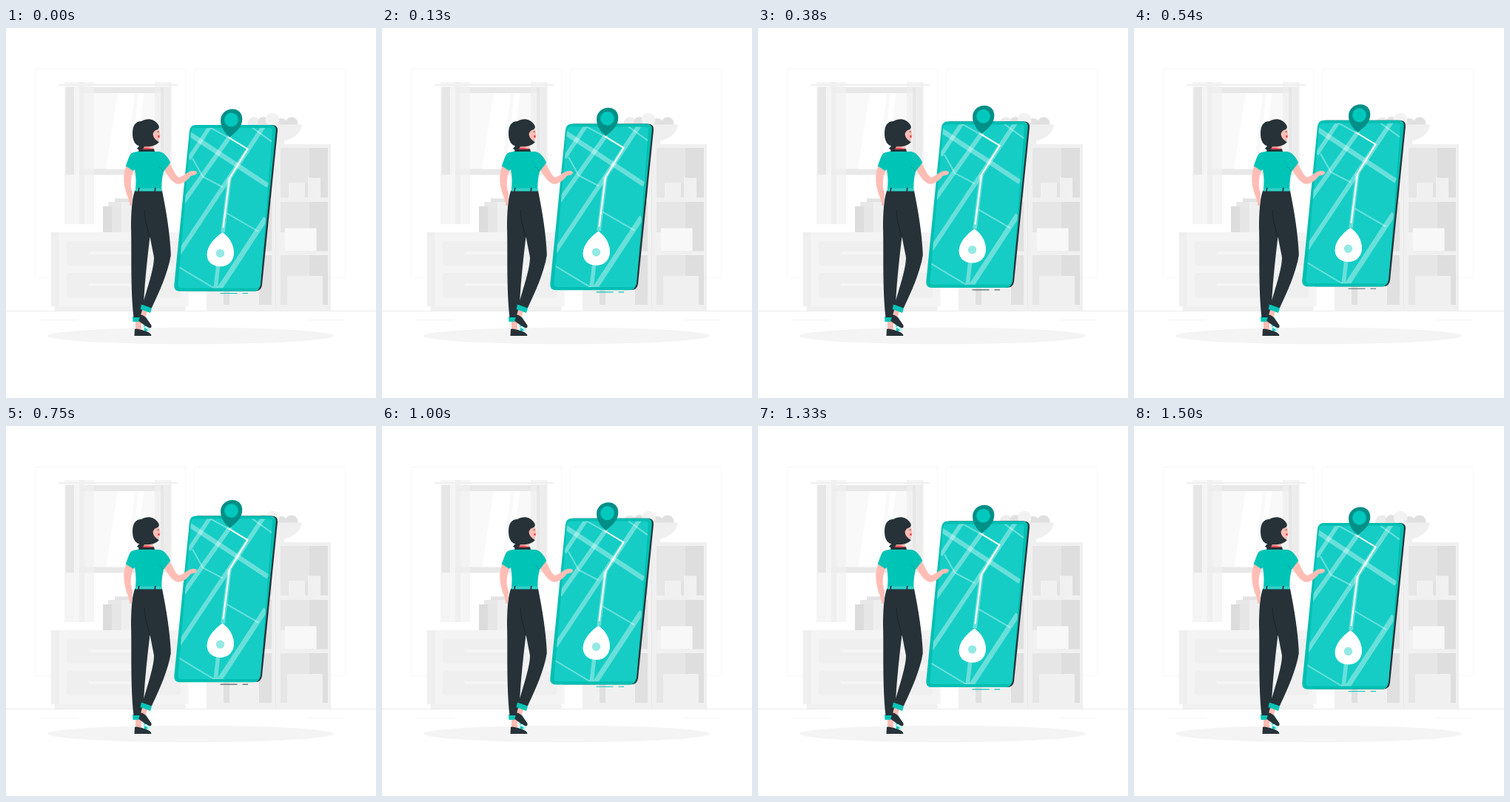
An HTML page with a canvas for the animation above (1.54 s loop, 500 by 500 pixels).

```html
<!DOCTYPE html>
<html lang="en">
<head>
<meta charset="utf-8">
<title>Map walk</title>
<style>
  html, body { margin: 0; width: 100%; height: 100%; overflow: hidden; background: #fff; }
  canvas { display: block; width: 500px; height: 500px; }
</style>
</head>
<body>
<canvas id="stage" width="500" height="500"></canvas>
<script>
const ctx = document.getElementById('stage').getContext('2d');
const LOOP = 1540, STEPS = 37, PEAK = 18, LIFT = 9.4;
const DARK = '#263238', SKIN = '#ffbdb5', TEAL = '#00c4b6', DEEP = '#008f87';

function box(color, x1, y1, x2, y2, r = 0) {
  ctx.fillStyle = color;
  ctx.beginPath();
  ctx.roundRect(x1, y1, x2 - x1, y2 - y1, r);
  ctx.fill();
}

function oval(color, x, y, rx, ry = rx) {
  ctx.fillStyle = color;
  ctx.beginPath();
  ctx.ellipse(x, y, rx, ry, 0, 0, Math.PI * 2);
  ctx.fill();
}

function shape(color, d) {
  ctx.fillStyle = color;
  ctx.fill(new Path2D(d));
}

function line(color, width, d) {
  ctx.strokeStyle = color;
  ctx.lineWidth = width;
  ctx.stroke(new Path2D(d));
}

function room() {
  box('#fff', 0, 0, 500, 500);
  line('#f8f8f8', 1, 'M39.5 55.5H242.5V337.5H39.5Z M254.5 55.5H458.5V337.5H254.5Z');
  line('#ebebeb', 1, 'M0 382.5H500');
  line('#f5f5f5', 1, 'M48 394.5H97 M407 394.5H456');
  oval('#f4f4f4', 249.5, 416, 193.5, 11.3);
}

function windowFrame() {
  box('#e8e8e8', 80, 80, 222, 198.5);
  box('#f9f9f9', 92, 88, 212, 190.5);
  shape('#fff', 'M151 88H174L162 190.5H135Z M179 88H186L174 190.5H167Z');
  ctx.globalAlpha = 0.72;
  box('#f1f1f1', 79, 73, 119, 265);
  box('#e4e4e4', 81, 80, 92, 198);
  box('#f7f7f7', 92, 73, 99, 265);
  box('#ededed', 99, 73, 106, 265);
  box('#efefef', 201, 73, 224, 198);
  box('#e4e4e4', 209, 80, 213, 198);
  ctx.globalAlpha = 1;
  box('#f0f0f0', 71, 75.7, 231.5, 78);
}

function dresser() {
  box('#dcdcdc', 131, 241, 144, 276);
  box('#f0f0f0', 147, 230.5, 172, 276);
  box('#e2e2e2', 147, 230.5, 172, 235);
  box('#e8e8e8', 138, 235, 168, 241);
  box('#e6e6e6', 143, 241, 156, 276);
  box('#efefef', 156, 235, 168, 276);
  box('#f0f0f0', 66, 376, 242.5, 382);
  box('#f4f4f4', 61, 276, 246.5, 376);
  box('#efefef', 61, 276, 72, 376);
  for (const y of [288, 331]) {
    box('#efefef', 82, y, 236, y + 33, 4);
    box('#f5f5f5', 112, y + 14, 206, y + 18);
  }
}

function shelf() {
  oval('#ebebeb', 335, 129, 8.5);
  oval('#e0e0e0', 348, 128, 8);
  oval('#e0e0e0', 372, 130, 8);
  oval('#dfdfdf', 386, 129, 8.5);
  oval('#f2f2f2', 360, 124, 9.3);
  shape('#efefef', 'M328 130.5H400C398 144 384 154 364 154C344 154 330 144 328 130.5Z');
  box('#f0f0f0', 352, 153, 376, 157);

  box('#f0f0f0', 271, 157, 439, 382.5);
  for (const [top, bottom] of [[162, 229], [235, 301.5], [307, 374]]) {
    box('#e0e0e0', 294, top, 359, bottom);
    box('#e6e6e6', 371, top, 410, bottom);
    box('#dedede', 410, top, 435, bottom);
  }
  box('#f0f0f0', 302, 335, 342, 374);
  line('#e9e9e9', 1, 'M364.5 157V382');

  box('#f0f0f0', 382, 209, 404, 229);
  box('#e2e2e2', 404, 209, 408, 229);
  box('#f0f0f0', 408, 202.5, 425, 229);
  box('#f8f8f8', 377, 270.5, 419.5, 301.5);
  box('#f2f2f2', 371, 276, 377, 301.5);
  box('#f0f0f0', 380, 335, 428, 374);
}

function roads() {
  ctx.save();
  ctx.clip(new Path2D('M255 135H356Q360.5 135 360 140L344 346Q343.5 351.5 338 351.5H237Q232 351.5 232.5 346L250 140Q250.5 135 255 135Z'));
  box('#15cdc5', 225, 130, 370, 360);
  const pale = 'rgba(255,255,255,.36)';
  line(pale, 6.5, 'M247 142.500L354 213');
  line(pale, 6, 'M348 133L234 304 M303 146L240 235');
  line(pale, 5.5, 'M276 133L247 177');
  line(pale, 7, 'M351 257L288 353');
  line(pale, 5.5, 'M287 318L283 353 M302 203L293 276');
  line(pale, 2, 'M252 176L266 201L293 215 M275 134L302 149 M332 134L361 155 M298 250L341 275 M232 322L282 352');
  ctx.restore();
}

function phone(step) {
  shape(DARK, 'M258 131H359Q367.500 131 367 139L346 347Q345 355.500 337 355.500H245Z');
  shape('#00bfb2', 'M257 131H357Q365.500 131 364.800 139L343.600 347Q342.500 355.700 334.500 355.700H235Q226.500 355.700 227.300 347L248 139Q249 131 257 131Z');
  roads();
  ctx.lineJoin = 'miter';
  line('#fff', 2, 'M301 148L326.500 163.500L302 203L293.500 270');
  shape('#fff', 'M292.500 276C301 282 308 292 308 304C308 315 300 322.300 290 322.300C279 322.300 271.500 316 271.500 306C272 293 283 283 292.500 276Z');
  oval('#94e9e4', 289.500, 304.500, 5.700);
  shape(DEEP, 'M302.500 147.500C295 141 290 134 290 125C290 116 297 109.400 306 109.400C314 109.400 319.300 115 319.300 123C319 135 310 141 302.500 147.500Z');
  oval('#00c8bc', 304.500, 124, 9.400);
  const tint = step > 6 && step < 21 ? '#50686b' : '#12c3ba';
  line(tint, 1.2, 'M289.500 358.500H312.500 M319.500 358.500H327');
}

function legs() {
  shape(SKIN, 'M175 395H183L183 409H175Z M184 380L191 383L188 393L180 390Z');
  shape('#c9f3ef', 'M184 391L192 391L189 399L196 406L192 412L186 411L184 402Z');
  shape(TEAL, 'M186 396L190 401L187 404Z M187 405L192 408L187 411Z');
  shape(DARK, 'M174 407C178 405.500 181 408 184 408C189 410 196 411 196.500 416H173.500Z');
  shape(DARK, 'M177 388C182 386 185 388 189 391L196 401Q198 405 194 405.500C187 402 182 398 175 393Z');
  shape(TEAL, 'M171 390H181L179 397H171.500Z');
  shape(DARK, 'M174 220H211C217 250 222 281 222.800 307C219 330 208 355 196.500 379L184.500 375C190 354 200 326 200 310L194.500 282C190 320 187 350 186 375L181 391H172.500C168 350 170 300 169 270C169 250 170 232 174 220Z');
  shape(TEAL, 'M183 373.500L197 378.500L195 385L181.500 380Z');
  line('#172327', 1, 'M187.500 246C187 260 192 271 194 283');
}

function torso() {
  shape(SKIN, 'M163 184C157 199 158.500 214 165.500 231L167.500 240H170L171 223C167 212 168.500 202 173 190Z');
  shape(SKIN, 'M221 183C226 190 228 199 234 202C239 200 243 197 247 194.500C250 192.500 257 192 258 195C258 199 253 198.500 249.500 200C246 205 240 210.500 233 211C225 210 219 200 214 192Z');
  shape(TEAL, 'M180 167C172 167 168 169 166 175L161.700 186.500L172 193L174 191C176 201 176 211 174.500 220.500H210.500C210 210 211 202 213 194L222.300 182C219 175 214 168 207 167Z');
  line('#009f96', 1, 'M207 187L213 194');
  line('#35cfc6', 3.5, 'M175 218.500H210.500');
  line(DARK, 1.6, 'M179.800 216L179 222 M201.800 216L201 222');
}

function head() {
  shape(SKIN, 'M184 156H198L200 166H183Z');
  shape(DARK, 'M180 163C187 164.500 194 162 200 163.500L201 167H179Z');
  shape('#ed4a57', 'M185 162C190 161 196 162 199 164H185Z');
  shape(DARK, 'M177 163L181 158L187 160L183 167Z');
  shape(SKIN, 'M197 137H207L208.500 146L206 153H199Z');
  shape(DARK, 'M171 142C171 132 175 126 183 126C191 121 201 123 206 131Q208 135 205 137C202 138 200 139 198.500 143C199 149 203 152 207 154C202 160 193 161 183 160C174 159 171 152 171 142Z');
  oval('#f04b57', 206.400, 146.500, 1.400, 1.700);
  line(DARK, 0.8, 'M204.500 140.500L207 140');
}

function draw(now) {
  const step = Math.floor((now % LOOP) / LOOP * STEPS);
  const lift = LIFT * Math.max(0, 1 - Math.abs(step - PEAK) / PEAK);
  room();
  windowFrame();
  dresser();
  shelf();
  ctx.save();
  ctx.translate(0, -lift);
  phone(step);
  ctx.restore();
  legs();
  torso();
  head();
}

const start = performance.now();
function tick() {
  draw(performance.now() - start);
  requestAnimationFrame(tick);
}
tick();
</script>
</body>
</html>
```
